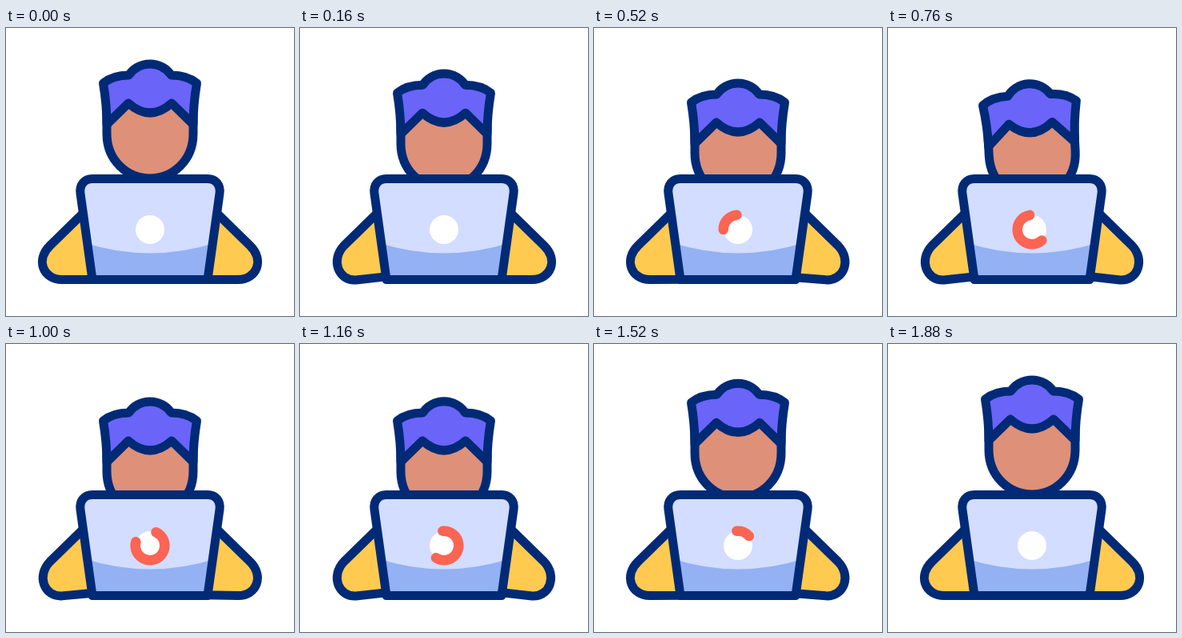
Animation of 360x360 px, one loop 2 s. Source, as an HTML page:

```html
<!DOCTYPE html>
<html lang="en">
<head>
<meta charset="utf-8">
<title>Working at a laptop</title>
<style>
  html, body { margin: 0; height: 100%; overflow: hidden; background: #fff; }
  svg { display: block; width: 100%; height: 100%; }
  .line { stroke: #012a76; stroke-width: 11; stroke-linecap: round; stroke-linejoin: round; }
</style>
</head>
<body>
<svg viewBox="0 0 360 360">
  <defs>
    <path id="screen" d="M108 314.5L93 207C91.5 196 98 188.5 108 188.5H252C262 188.5 268.5 196 267 207L252 314.5Z"/>
    <clipPath id="inside"><use href="#screen"/></clipPath>
  </defs>

  <g id="head" class="line">
    <path fill="#de9079" d="M126 85V132C126 166 152 188 180 188S234 166 234 132V85Z"/>
    <path fill="#6a64f9" d="M121.5 69C130 62 142 59 153.5 59A32 32 0 0 1 206.5 59C218 59 230 62 238.5 69
      C236 84 234 96 234 120.5L207 94Q180 118 153 94L126 120.5C126 96 124 84 121.5 69Z"/>
  </g>

  <path id="left" class="line" fill="#ffca4f"/>
  <path id="right" class="line" fill="#ffca4f" transform="matrix(-1 0 0 1 360 0)"/>

  <use href="#screen" fill="#d2ddff"/>
  <path clip-path="url(#inside)" fill="#93b1f3" d="M98 268.5Q180 294.5 262 268.5V320H98Z"/>
  <use href="#screen" class="line" fill="none"/>

  <circle cx="180" cy="252" r="18" fill="#fff"/>
  <path id="ring" fill="none" stroke="#fc6453" stroke-width="12.6" stroke-linecap="round"
    pathLength="360" transform="rotate(-5 180 252)"
    d="M180 233.7a18.3 18.3 0 0 0 0 36.6a18.3 18.3 0 0 0 0 -36.6"/>
</svg>
<script>
const LOOP = 2000;
const [head, left, right, ring] = ['head', 'left', 'right', 'ring'].map(id => document.getElementById(id));

const span = (t, from, to) => Math.min(1, Math.max(0, (t - from) / (to - from)));
const smooth = x => x * x * (3 - 2 * x);
const easeOut = x => x * (2 - x);

// One key press every 200 ms, with a short rest between presses.
const press = (t, peak) => Math.max(0, 0.25 + Math.cos((t - peak) / 200 * 2 * Math.PI)) / 1.25;

// The shoulder stays put while the hand end of the forearm rises.
function drawArm(arm, t, start, peak) {
  const lift = t > start && t < 1880 ? press(t, peak) : 0;
  const x = 1.5 * lift, base = 314.5 + 0.5 * lift;
  arm.setAttribute('d', `M99 229L55 272C${36.5 + x} 290 ${46.5 + x} ${base + x} 70 ${base}L112 ${314.5 - 4.5 * lift}Z`);
}

function draw(t) {
  const sunk = 24 * easeOut(span(t, 60, 400)) + 3 * smooth(span(t, 640, 1000));
  const y = sunk * (1 - easeOut(span(t, 1160, 1760)));
  const tilt = -3 * Math.sin(Math.PI * span(t, 520, 1000)) ** 2;
  head.setAttribute('transform', `translate(0 ${y}) rotate(${tilt} 180 128)`);

  drawArm(left, t, 80, 176);
  drawArm(right, t, 230, 350);

  const front = 360 * smooth(span(t, 225, 1165));
  const back = 360 * smooth(span(t, 690, 1790));
  ring.setAttribute('stroke-dasharray', `${front - back} 720`);
  ring.setAttribute('stroke-dashoffset', -back);
  ring.setAttribute('visibility', front - back > 0.5 ? 'visible' : 'hidden');
}

const begin = performance.now();
function tick() {
  draw((performance.now() - begin) % LOOP);
  requestAnimationFrame(tick);
}
tick();
</script>
</body>
</html>
```
